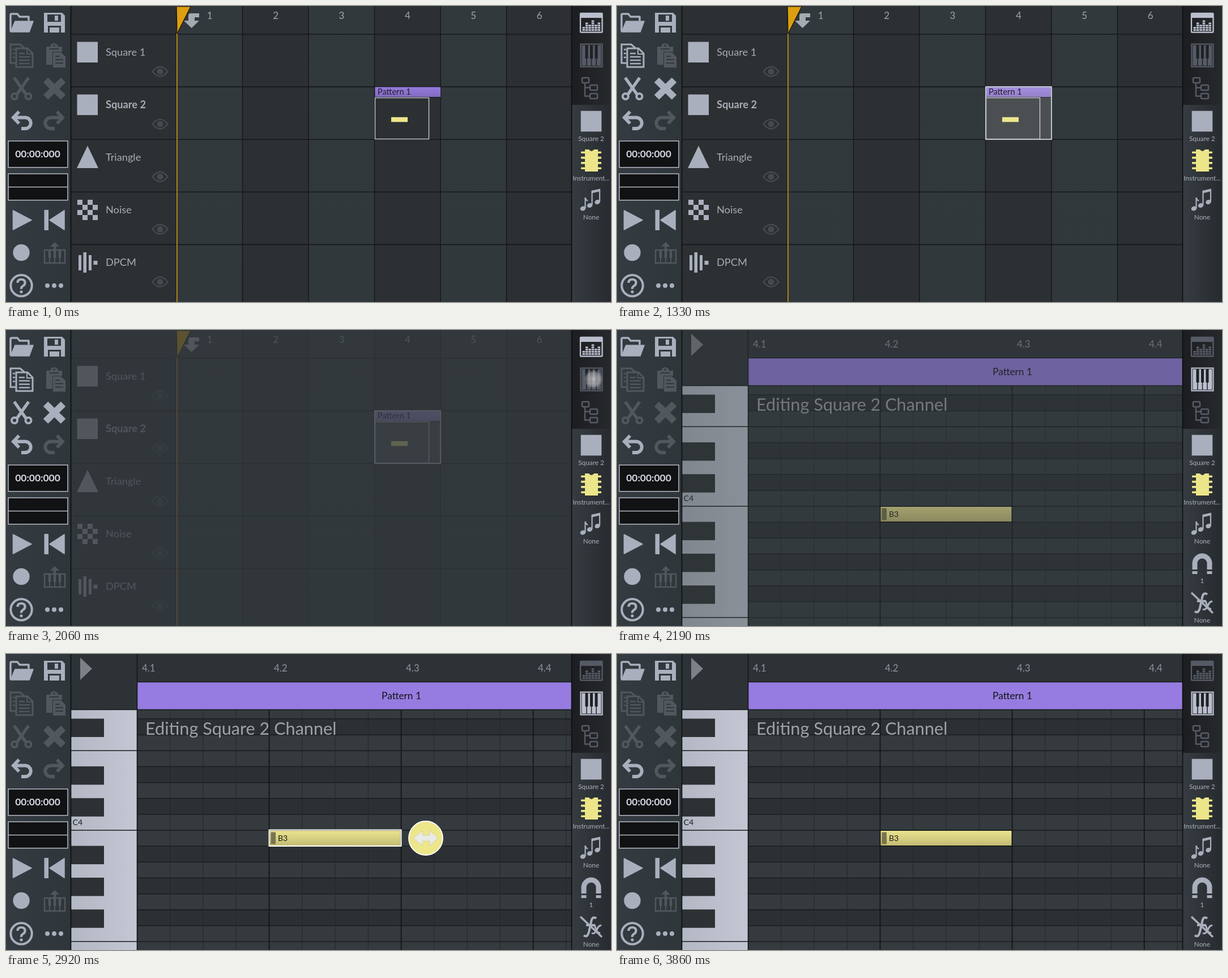
An HTML page that plays this animation: 1068 by 524 pixels, repeating every 4120 ms.

```html
<!DOCTYPE html>
<html lang="en">
<head>
<meta charset="utf-8">
<title>Pattern editor</title>
<style>
html, body { margin: 0; width: 100%; height: 100%; overflow: hidden; background: #2d3235; }
svg { display: block; width: 100vw; height: 100vh; font-family: Lato, "Open Sans", sans-serif; }
</style>
</head>
<body>
<svg id="stage" viewBox="0 0 1068 524"></svg>
<script>
const LOOP = 4120;
const ON = '#a9afbc', OFF = '#51575d', BAR = '#31383d', LINE = '#16181a';
const range = (n, f) => Array.from({ length: n }, (_, i) => f(i)).join('');
const rect = (x, y, w, h, fill = 'currentColor', more = '') => `<rect x="${x}" y="${y}" width="${w}" height="${h}" fill="${fill}" ${more}/>`;
const frame = (x, y, w, h, color, sw, more = '') => rect(x, y, w, h, 'none', `stroke="${color}" stroke-width="${sw}" ${more}`);
const fill = (d, color = 'currentColor', more = '') => `<path d="${d}" fill="${color}" ${more}/>`;
const line = (d, sw, color = 'currentColor', more = '') => `<path d="${d}" fill="none" stroke="${color}" stroke-width="${sw}" ${more}/>`;
const dot = (x, y, r, color = 'currentColor', more = '') => `<circle cx="${x}" cy="${y}" r="${r}" fill="${color}" ${more}/>`;
const ring = (x, y, r, sw) => dot(x, y, r, 'none', `stroke="currentColor" stroke-width="${sw}"`);
const text = (x, y, s, size, color, more = '') => `<text x="${x}" y="${y}" font-size="${size}" fill="${color}" ${more}>${s}</text>`;
const group = (color, body, id = '') => `<g ${id && `id="${id}"`} color="${color}">${body}</g>`;
const ramp = (id, a, b, across) => `<linearGradient id="${id}" x2="${across ? 1 : 0}" y2="${across ? 0 : 1}"><stop stop-color="${a}"/><stop offset="1" stop-color="${b}"/></linearGradient>`;
const MID = 'text-anchor="middle"', BOLD = 'font-weight="700"';
const ROUND = 'stroke-linejoin="round" stroke-linecap="round"';
const SOFT = 'stroke="currentColor" stroke-width="1.6" stroke-linejoin="round"';

const defs = `<defs>
${ramp('left', '#343b41', '#2f363a', 1)}${ramp('right', '#363c41', '#272b2f', 1)}${ramp('tabs', '#1c1d20', '#26292c', 1)}
${ramp('cell', '#32393c', '#31383b')}${ramp('purple', '#957bdd', '#806bbd')}
${ramp('keys', '#b3b8c4', '#c2c7d3', 1)}${ramp('note', '#ebe48e', '#c3bb74')}
<radialGradient id="touch"><stop stop-color="#ddd" stop-opacity=".75"/><stop offset=".7" stop-color="#bbb" stop-opacity=".55"/><stop offset="1" stop-color="#aaa" stop-opacity="0"/></radialGradient>
<clipPath id="main"><path d="M115 0H998V524H115Z"/></clipPath></defs>`;

// Left toolbar
const folder = line('M8 44V16Q8 14 10 14H20L24 19H40V25', 3.5, 'currentColor', ROUND)
  + fill('M16 27H48L41 46H8Z', 'currentColor', SOFT);
const floppy = fill('M67 12H99L104 17V47H67Z') + rect(73, 15, 24, 13, BAR) + rect(86, 17, 6, 9)
  + rect(74, 35, 23, 12, BAR) + rect(77, 38, 17, 9);
const copyIcon = line('M17 101H8V68H25L33 75', 3) + line('M18 75H38L47 84V108H18Z', 3) + line('M37 75V85H47', 2)
  + line('M23 84H33M23 90H42M23 96H42M23 102H42M12 77H16M12 84H16M12 91H16', 2.4);
const pasteIcon = fill('M71 72H78Q79 66 85 66T92 72H99V81H82V104H71Z') + line('M77 76H93', 2, BAR) + dot(85, 70, 1.8, BAR)
  + fill('M83 82H97L105 90V109H83Z') + line('M87 89H95M87 95H101M87 101H101', 2, BAR);
const scissors = line('M14.500 127L35 156M40 127L19.500 156'.replaceAll('500', '5'), 5.5) + ring(15, 160, 5, 4) + ring(39.5, 160, 5, 4);
const cross = line('M70 131L101 161.5M101 131L70 161.5', 12);
const undo = line('M23 187L13 197.5L23 208M13 197.5H34A9.7 9.7 0 0 1 34 217H27', 5.8);
const keyUp = line('M68 432H104V455H68Z', 2.5) + line('M77 445V455M86 445V455M95 445V455', 2)
  + line('M77 432V446M86 432V446M95 432V446', 4.5) + fill('M86 418L94 426H88V431H84V426H78Z');
const screen = (y, h) => rect(4, y, 105, h, '#111213', 'stroke="#b5bac5" stroke-width="1.5"');

const leftBar = rect(0, 0, 115, 524, 'url(#left)')
  + group(ON, folder + floppy + undo
    + fill('M12.5 362L45 379L12.5 396Z', 'currentColor', SOFT)
    + rect(67.5, 361, 7.5, 36) + fill('M103 362V396L77 379Z', 'currentColor', SOFT)
    + dot(27, 436.5, 14.7) + ring(27, 495, 18.7, 4)
    + line('M20.5 490Q20.5 484 27 484T33.5 490Q33.5 493.5 30 495.5T27 501', 4.2) + dot(27, 506, 2.6)
    + range(3, i => dot(73 + 12 * i, 495, 4)))
  + group(OFF, copyIcon + scissors + cross, 'edit')
  + group(OFF, pasteIcon + keyUp + `<g transform="translate(113)scale(-1 1)">${undo}</g>`)
  + screen(239, 46.7) + screen(297, 46.7) + line('M4 320.5H109', 1.4, '#b5bac5')
  + text(56, 268, '00:00:000', 17.4, '#d5d8e4', `${BOLD} ${MID}`)
  + line('M114.5 0V524', 1.6, '#0d0e0f');

// Right toolbar
const levels = [2, 4, 3, 5, 3, 4];
const seqTab = frame(1014, 13, 38.5, 33.5, 'currentColor', 2.4, 'rx="1"') + rect(1014, 13, 38.5, 8)
  + levels.map((n, i) => range(n, j => rect(1017.5 + 5.4 * i, 41 - 3.9 * j, 4.5, 3))).join('');
const pianoTab = rect(1014.5, 67.5, 38, 40, '#1f2124', 'stroke="currentColor" stroke-width="2.2"') + rect(1016.5, 69.5, 34, 36)
  + line('M1025 92V106M1033.5 92V106M1042 92V106', 1.5, '#1f2124') + line('M1025 69V93M1033.5 69V93M1042 69V93', 5, '#1f2124');
const treeTab = frame(1017, 127, 12, 9, 'currentColor', 2.6, 'rx="2"') + frame(1031, 140, 13, 9, 'currentColor', 2.6, 'rx="2"')
  + frame(1031, 155, 13, 9, 'currentColor', 2.6, 'rx="2"') + line('M1022 137V159.5H1030M1022 144.5H1030', 2.4);
const chip = fill('M1022 254H1029Q1033.5 260 1038 254H1045V293H1022Z')
  + range(4, i => rect(1015, 257.5 + 9.3 * i, 36, 3.6, 'currentColor', 'rx="1"'));
const noteHead = (x, y) => `<ellipse cx="${x}" cy="${y}" rx="4.8" ry="3.9" fill="currentColor" transform="rotate(-20 ${x} ${y})"/>`;
const notes = line('M1022.5 358V339Q1023 343 1027 345', 2.2) + line('M1034.5 352V328L1048 325V346', 2.2)
  + fill('M1034 327L1049 323.5V328L1034 331.5Z') + noteHead(1018.5, 358.5) + noteHead(1030.5, 353) + noteHead(1044, 347);
const magnet = line('M1020 424V413A13 13 0 0 1 1046 413V424', 9) + fill('M1015.5 427H1024.5V432H1015.5ZM1041.5 427H1050.5V432H1041.5Z');
const effects = line('M1020 498Q1026 503 1029 492L1033 474Q1035 463 1042 468M1024 480H1040', 4)
  + line('M1036 481Q1040 479 1041 486T1049 494M1051 481Q1047 479 1043 488T1034 494', 3.2) + line('M1014 465L1052 501', 3.4);
const label = (y, s) => text(1033, y, s, 11.8, '#abb0bb', MID);

const rightBar = rect(998, 0, 70, 524, 'url(#right)') + rect(998, 0, 70, 175, 'url(#tabs)')
  + group('#b9bfcd', seqTab, 'seqTab') + group('#555b66', pianoTab, 'pianoTab') + group('#555b66', treeTab)
  + group('#aaafbd', rect(1014.7, 185.7, 36.6, 36.6) + notes)
  + group('#ece589', chip)
  + label(239, 'Square 2') + label(309, 'Instrument...') + label(378, 'None')
  + group('#aaafbd', magnet + effects + label(448, '1') + label(518, 'None'), 'rollTools')
  + line('M998.5 0V524', 1.6, '#0d0e0f');

// Sequencer
const COL = 116.5, ROW = 93.1;
const square = y => rect(125.5, y, 36.5, 36.5);
const icons = [
  square(63.5),
  square(156.6),
  fill('M144 247.5L163 287H125Z'),
  range(16, i => (i + (i >> 2)) % 2 ? '' : rect(126 + 9 * (i % 4), 343 + 9 * (i >> 2), 9, 9)),
  rect(128, 441, 5, 27) + rect(136.5, 436, 5.5, 36) + rect(146, 441, 5, 27) + rect(154.5, 451, 7, 7)
];
const eye = y => line(`M258.5 ${y}Q272 ${y - 17} 285.5 ${y}Q272 ${y + 17} 258.5 ${y}Z`, 2.4, '#454a4e') + dot(272, y, 5.5, '#454a4e');
const names = ['Square 1', 'Square 2', 'Triangle', 'Noise', 'DPCM'];

const sequencer = rect(115, 0, 883, 524, '#2c3033')
  + range(3, i => rect(301.5 + 2 * COL * i, 0, COL, 524, 'url(#cell)'))
  + range(5, i => line(`M115 ${50 + ROW * i}H998`, 1.6, LINE))
  + range(6, i => line(`M${301 + COL * i} 0V524`, 1.4, LINE) + text(359.7 + 116.4 * i, 23, i + 1, 17, '#a0a5ad', MID))
  + names.map((s, i) => group('#aaafbd', icons[i]) + text(176, 88 + ROW * i, s, 18.2, '#a9adb6', i === 1 ? BOLD : '') + eye(116 + ROW * i)).join('')
  + rect(651.5, 143.5, 115.5, 18, 'url(#purple)') + line('M651 161.7H767', 1.2, LINE)
  + rect(651, 143, 116.5, 93, '#fff', 'id="tint" opacity=".15"')
  + frame(651.5, 162.5, 95, 73, '#c7c9cd', 1.4) + rect(680, 196.8, 29, 8.5, '#ede68d')
  + text(656, 157, 'Pattern 1', 14.5, '#221e2c')
  + frame(651, 143, 116, 93, '#fff', 2, 'id="outline"')
  + rect(301, 0, 1.5, 524, '#dd9f13') + fill('M301 1H326L302 49Z', '#dd9f0f', 'stroke="#191713" stroke-width="1.2"')
  + fill('M341 13H326Q322 13 322 17V26H314L327.5 39L341 26H333V20H341Z', '#a6abb2');

// Piano roll
const STEP = 28.15, TOP = 86.8, BEAT = 233.1;
const isBlack = i => [1, 4, 6, 9, 11, 13].includes(i);
const roll = rect(115, 0, 883, 524, '#343a3e')
  + range(16, i => {
    const y = TOP + STEP * i;
    return (isBlack(i) ? rect(232, y, 766, STEP, '#2c3033') : '') + line(`M232 ${y}H998`, 1.3, '#17191b');
  })
  + range(14, i => line(`M${231.4 + BEAT / 4 * i} 98V524`, i % 4 ? 1 : 1.7, i % 4 ? '#24282b' : '#131516'))
  + rect(115, 98, 116, 426, 'url(#keys)')
  + range(16, i => isBlack(i) ? rect(115, TOP + STEP * i - 0.5, 58, 32.5, '#2d3134') : '')
  + line('M115 171H231M115 312H231M115 509H231', 1.6, '#191b1d')
  + text(117.5, 303, 'C4', 14.3, '#1d1f21')
  + rect(115, 0, 883, 98, '#2d3236') + fill('M131 6.5L152 26L131 46Z', '#7d8187')
  + range(4, i => text(240 + 233 * i, 31, '4.' + (i + 1), 17, '#90959d'))
  + rect(232, 50, 766, 48, '#967ce0') + text(698, 80, 'Pattern 1', 17.3, '#151319', MID)
  + line('M232 49.5H998M115 98.5H998M231.5 0V524', 1.6, LINE)
  + text(246, 143, 'Editing Square 2 Channel', 30.6, '#9da2a8')
  + rect(465, 312.5, 232, 27, 'url(#note)', 'stroke="#1a1b17"') + rect(467.5, 315.5, 8.5, 21, '#78744d') + text(480, 331, 'B3', 14, '#1c1b14')
  + group('#fff', frame(464.5, 311.5, 233, 28.5, '#fff', 2)
    + dot(741, 326, 30, '#ede68a', 'stroke="#fff" stroke-width="1.8"')
    + fill('M719 326L735 312.5V321H748V312.5L763 326L748 339.5V331H735V339.5Z', '#e9e9e6', 'stroke="#d3cf9a" stroke-width=".8"'), 'picked');

const stage = document.getElementById('stage');
stage.innerHTML = defs
  + `<g clip-path="url(#main)"><g id="sequencer">${sequencer}</g><g id="roll">${roll}</g>${rect(115, 0, 883, 524, '#32393c', 'id="veil"')}</g>`
  + leftBar + rightBar + dot(0, 0, 17, 'url(#touch)', 'id="tap"');

const parts = {};
for (const el of stage.querySelectorAll('g[id], rect[id], circle[id]')) parts[el.id] = el;
const show = (el, yes) => el.setAttribute('display', yes ? 'inline' : 'none');

// start, end, x, y of each touch
const taps = [[330, 660, 708, 190], [1060, 1290, 708, 190], [1990, 2190, 1037, 87], [2650, 2880, 580, 326], [3580, 3820, 580, 326]];
const ROLL_AT = 2190;

function draw(t) {
  const inRoll = t >= ROLL_AT, selected = t >= 530 && !inRoll;
  show(parts.sequencer, !inRoll);
  show(parts.roll, inRoll);
  show(parts.rollTools, inRoll);
  show(parts.tint, selected);
  show(parts.outline, selected);
  parts.outline.setAttribute('stroke', t < 1200 ? '#fff' : '#c0c3cc');
  show(parts.picked, t >= 2790 && t < 3720);
  parts.edit.setAttribute('color', selected ? ON : OFF);
  parts.seqTab.setAttribute('color', inRoll ? '#555b66' : '#b9bfcd');
  parts.pianoTab.setAttribute('color', inRoll ? '#b9bfcd' : '#555b66');
  parts.veil.setAttribute('opacity', t < 2060 || t >= 2320 ? 0 : inRoll ? 0.39 : 0.75);

  const tap = taps.find(([a, b]) => t >= a && t < b);
  show(parts.tap, tap);
  if (tap) {
    const [a, b, x, y] = tap;
    const fade = b === ROLL_AT ? 1 : (b - t) / 70;
    parts.tap.setAttribute('transform', `translate(${x} ${y})`);
    parts.tap.setAttribute('opacity', Math.min(1, (t - a + 30) / 70, fade));
  }
}

let start;
function tick(now) {
  start ??= now;
  draw((now - start) % LOOP);
  requestAnimationFrame(tick);
}
draw(0);
requestAnimationFrame(tick);
</script>
</body>
</html>
```
